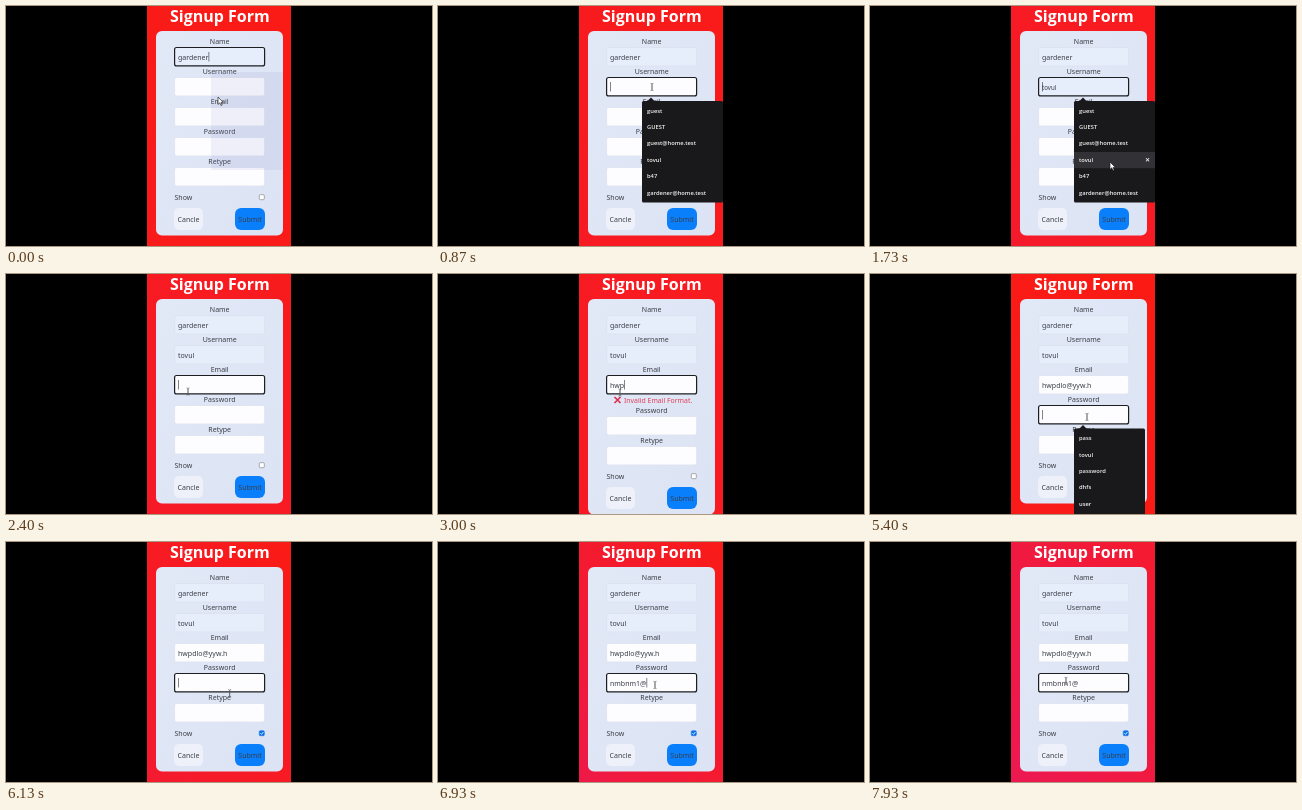
An HTML page that plays this animation: 426x240 px, repeating every 8000 ms.

```html
<!DOCTYPE html>
<html lang="en">
<head>
<meta charset="utf-8">
<title>Signup Form</title>
<style>
  html, body { margin: 0; width: 100%; height: 100%; overflow: hidden; background: #000; }
  svg { display: block; width: 100%; height: 100%; }
  text { font-family: "Noto Sans", "Open Sans", sans-serif; font-size: 7px; fill: #3a3e46; white-space: pre; }
  .mid { text-anchor: middle; }
  .title { font: 700 16px "Open Sans", "Noto Sans", sans-serif; fill: #fff; }
  .item { font: 600 5.8px "Open Sans", "Noto Sans", sans-serif; fill: #f2f2f2; }
  .error { font-size: 6.9px; fill: #e0405a; }
</style>
</head>
<body>
<svg id="stage" viewBox="0 0 426 240">
  <defs>
    <linearGradient id="bg" x1="0" y1="1" x2="1" y2="0">
      <stop id="left" offset="0"/><stop id="right" offset="1"/>
    </linearGradient>
    <linearGradient id="paper" x1="0" y1="0" x2="1" y2="1">
      <stop offset="0" stop-color="#e1e8f6"/><stop offset="1" stop-color="#dce3f4"/>
    </linearGradient>
    <clipPath id="page"><rect x="141" width="144" height="240"/></clipPath>
  </defs>
  <rect width="426" height="240"/>
  <g id="root" clip-path="url(#page)">
    <rect x="141" width="144" height="240" fill="url(#bg)"/>
  </g>
</svg>
<script>
const LOOP = 8000, STEP = 1000 / 15, ERROR_SHIFT = 11;
const $ = id => document.getElementById(id);
const root = $("root");

function add(parent, tag, attrs, content) {
  const el = document.createElementNS("http://www.w3.org/2000/svg", tag);
  set(el, attrs);
  if (content) el.textContent = content;
  parent.appendChild(el);
  return el;
}
function set(el, attrs) {
  for (const key in attrs) el.setAttribute(key, attrs[key]);
}
const group = parent => add(parent, "g", {});
const box = (parent, x, y, width, height, rx, fill) =>
  add(parent, "rect", { x, y, width, height, rx, fill });
const label = (parent, x, y, content, cls = "") =>
  add(parent, "text", { x, y, class: cls }, content);
const show = (el, on) => el.setAttribute("visibility", on ? "visible" : "hidden");

// Keys are [time, value, value...], joined by eased or linear motion.
function track(keys, t, ease = u => u) {
  const i = keys.findIndex(k => k[0] > t);
  if (i < 0) return keys[keys.length - 1].slice(1);
  if (i === 0) return keys[0].slice(1);
  const a = keys[i - 1], b = keys[i];
  const u = ease((t - a[0]) / (b[0] - a[0]));
  return a.slice(1).map((v, n) => v + (b[n + 1] - v) * u);
}
const smooth = u => u * u * (3 - 2 * u);
const typed = (word, from, to, t) =>
  t < from ? "" : word.slice(0, Math.floor((t - from) / (to - from) * word.length) + 1);

label(root, 213.9, 15.5, "Signup Form", "title mid");
const card = box(root, 150, 25, 127, 204.5, 6, "url(#paper)");

function makeField(parent, name, y) {
  label(parent, 213.7, y - 2.6, name, "mid");
  const frame = box(parent, 168.6, y + .5, 90, 18.4, 2, "#fff");
  const text = label(parent, 172, y + 12.5, "");
  const caret = box(parent, 0, y + 5, .6, 9.5, 0, "#333");
  return { frame, text, caret };
}
const lower = group(root);
const fields = ["Name", "Username", "Email", "Password", "Retype"]
  .map((name, i) => makeField(i < 3 ? root : lower, name, 41 + 30 * i));

label(lower, 168.5, 194, "Show");
const check = box(lower, 253.3, 188.7, 5, 5, 1, "#fff");
const tick = add(lower, "path", { d: "M254.4 191.2l1.1 1.2 1.9-2.4", fill: "none", stroke: "#fff", "stroke-width": .8 });
box(lower, 168, 202, 29, 22, 5, "#eef1f9");
label(lower, 182.5, 215.7, "Cancle", "mid");
box(lower, 229, 202, 30, 22, 6, "#0a7ffb");
label(lower, 244, 215.7, "Submit", "mid");

const error = group(root);
add(error, "path", { d: "M176.5 123l6 6m0-6l-6 6", stroke: "#e02f50", "stroke-width": 1.7, fill: "none" });
label(error, 186, 128.6, "Invalid Email Format.", "error");

const ghost = box(root, 205, 66, 72, 98, 1, "#8b90c8");

function makePopup(y, width, height, words) {
  const g = group(root);
  add(g, "path", { d: `M209 ${y + .5}l4-4 4 4z`, fill: "#19191b" });
  box(g, 204, y, width, height, 1.5, "#19191b");
  const hover = box(g, 204, y, width, 16.2, 0, "#323236");
  words.forEach((word, i) => label(g, 209, y + 11.6 + 16.4 * i, word, "item"));
  const cross = label(g, 275, 0, "✕", "item");
  return { g, hover, cross, y };
}
const nameMenu = makePopup(95, 81, 101.5,
  ["guest", "GUEST", "guest@home.test", "tovul", "b47", "gardener@home.test"]);
const passMenu = makePopup(154.5, 71, 100, ["pass", "tovul", "password", "dhfs", "user"]);

function hoverRow(menu, row) {
  const on = row >= 0, y = menu.y + 1.8 + 16.4 * row;
  set(menu.hover, { y, opacity: +on });
  set(menu.cross, { y: y + 9.9, opacity: +on });
}

const arrow = add(root, "path", {
  d: "M0 0v7.4l1.8-1.6 1.2 2.7 1.2-.5-1.2-2.6h2.3z",
  fill: "#fff", stroke: "#111", "stroke-width": .6
});
const beam = add(root, "path", {
  d: "M-1.5-3.6q1.5 0 1.5.7v5.8q0 .7-1.5.7M1.5-3.6q-1.5 0-1.5.7v5.8q0 .7 1.5.7",
  fill: "none", stroke: "#555", "stroke-width": .6
});

const mouse = [
  [0, 212, 91], [350, 212, 91], [650, 214, 81], [950, 214, 81], [1500, 240, 156],
  [1850, 240, 156], [2250, 182, 117], [2600, 182, 118.5], [4350, 182, 118.5],
  [4900, 217, 143], [5550, 217, 143], [5800, 255, 190], [5950, 255, 190],
  [6200, 217, 143], [7150, 217, 143], [7650, 196, 139], [8000, 196, 139]
];
const pink = [
  [0, .15, .05], [1730, .4, .15], [3000, .3, .2], [4200, .12, .08],
  [5400, .12, .03], [6930, .85, .1], [7930, 1, .45], [8000, 1, .47]
];
const tint = p => `rgb(${Math.round(251 - 15 * p)},${Math.round(27 - 2 * p)},${Math.round(18 + 64 * p)})`;

function draw(t) {
  const [left, right] = track(pink, t);
  $("left").setAttribute("stop-color", tint(left));
  $("right").setAttribute("stop-color", tint(right));

  const invalid = t >= 2600 && t < 4130;
  const shift = invalid ? ERROR_SHIFT : 0;
  card.setAttribute("height", 204.5 + shift);
  lower.setAttribute("transform", `translate(0 ${shift})`);
  show(error, invalid);
  ghost.setAttribute("opacity", Math.max(0, .13 * (1 - t / 400)));

  const [x, y] = track(mouse, t, smooth);
  const picked = t >= 1850;
  const preview = !picked && t >= 1420;
  const values = [
    "gardener",
    picked || preview ? "tovul" : "",
    t < 3100 ? typed("hwp", 2600, 3050, t) : "hwp" + typed("dlo@yyw.h", 3120, 4230, t),
    typed("nmbnm1@", 6300, 6950, t),
    ""
  ];
  const focus = t < 680 ? 0 : t < 2400 ? 1 : t < 5000 ? 2 : 3;
  fields.forEach((f, i) => {
    const active = i === focus;
    const filled = i === 0 || (i === 1 && (picked || preview));
    f.text.textContent = values[i];
    f.text.style.fontSize = i === 1 && preview ? "6.2px" : "7px";
    set(f.frame, {
      fill: filled ? "#e6eefc" : "#fdfdff",
      stroke: active ? "#1c1e22" : "#d9deeb",
      "stroke-width": active ? 1.2 : .6
    });
    const width = values[i] && !(i === 1 && preview) ? f.text.getComputedTextLength() : 0;
    f.caret.setAttribute("x", 172.2 + width);
    show(f.caret, active && t < 7500);
  });

  show(nameMenu.g, t >= 720 && t < 1850);
  hoverRow(nameMenu, t > 950 ? Math.min(3, Math.floor((y - 96) / 16.4)) : -1);
  show(passMenu.g, t >= 5050 && t < 5850);
  hoverRow(passMenu, -1);

  const checked = t >= 5880;
  set(check, { fill: checked ? "#0b73e8" : "#fff", stroke: checked ? "#0b73e8" : "#777", "stroke-width": .6 });
  show(tick, checked);

  const pointer = t < 520 || (t > 1000 && t < 2200) || (t > 5600 && t < 6130);
  show(arrow, pointer);
  show(beam, !pointer);
  set(pointer ? arrow : beam, { transform: `translate(${x} ${y})` });
}

const start = performance.now();
function tickFrame() {
  const t = (performance.now() - start) % LOOP;
  draw(Math.floor((t + 4) / STEP) * STEP);
  requestAnimationFrame(tickFrame);
}
tickFrame();
</script>
</body>
</html>
```
